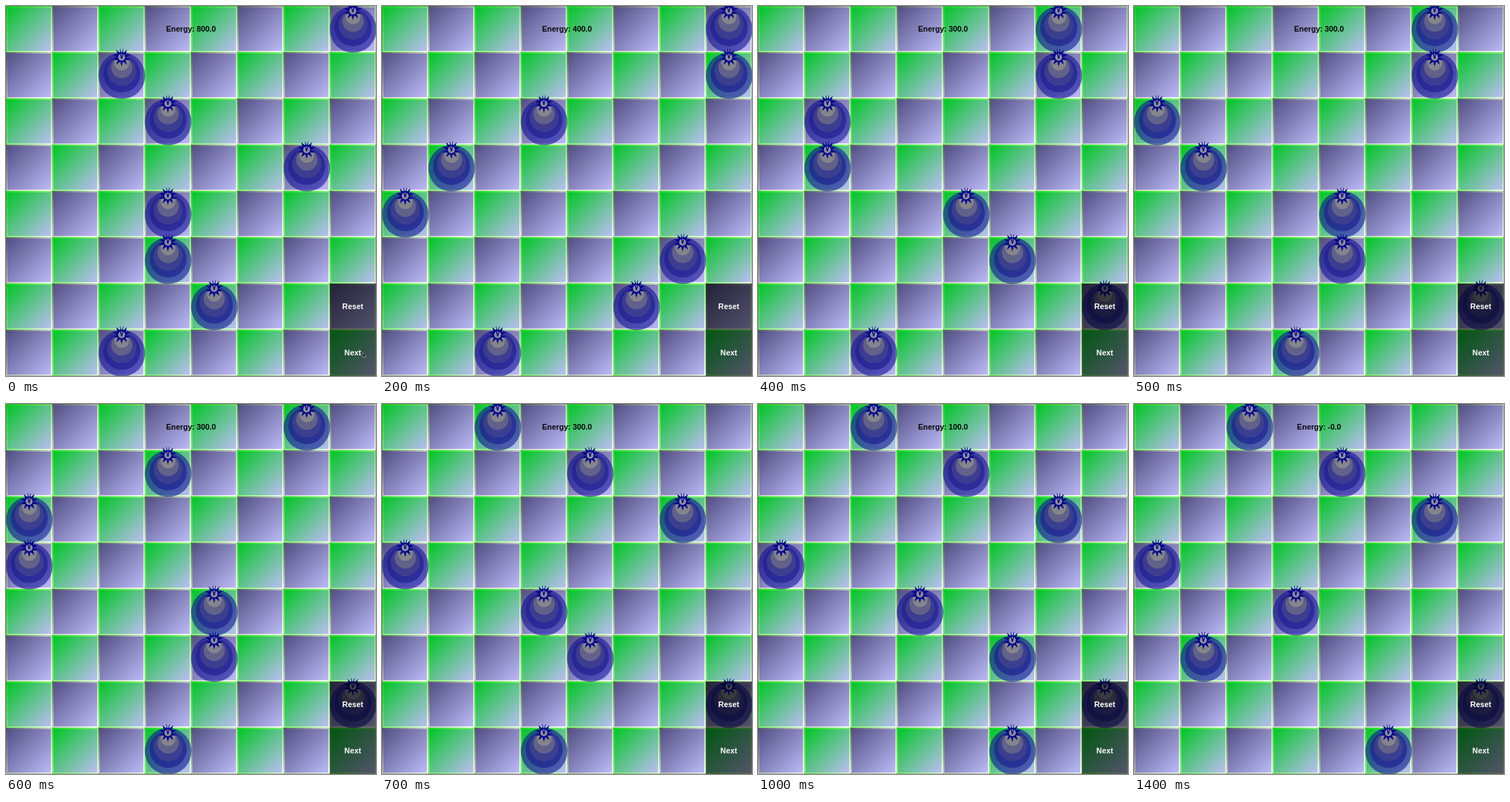
Write an HTML page that moves like this. It is 520 px wide and 520 px high and loops after 1600 ms.

```html
<!DOCTYPE html>
<html lang="en">
<head>
<meta charset="utf-8">
<title>Eight queens</title>
<style>
  html, body { margin: 0; width: 100%; height: 100%; overflow: hidden; background: #222; }
  svg { display: block; width: 520px; height: 520px; }
  text { font: bold 10.8px "Liberation Sans", Arial, sans-serif; text-anchor: middle; }
</style>
</head>
<body>
<svg id="stage" viewBox="0 0 520 520">
  <defs>
    <linearGradient id="green" x2="1" y2="1">
      <stop offset="0" stop-color="#00c624"/>
      <stop offset="1" stop-color="#bebef6"/>
    </linearGradient>
    <linearGradient id="violet" x2="1" y2="1">
      <stop offset="0" stop-color="#504e82"/>
      <stop offset="1" stop-color="#bebcf8"/>
    </linearGradient>
    <linearGradient id="greenEdge" x2="1" y2="1">
      <stop offset="0" stop-color="#14e01c"/>
      <stop offset=".5" stop-color="#7cf46c"/>
      <stop offset="1" stop-color="#e4ffe0"/>
    </linearGradient>
    <linearGradient id="violetEdge" x2="1" y2="1">
      <stop offset="0" stop-color="#5c5c70"/>
      <stop offset=".5" stop-color="#c4ccc4"/>
      <stop offset="1" stop-color="#f6fff2"/>
    </linearGradient>
    <g id="queen">
      <g id="body"></g>
      <path id="star" fill="#00008f"/>
      <circle cx="32.5" cy="7" r="5" fill="#8c8c98"/>
      <path d="M30.5 1L32.5 9L34.5 1" fill="none" stroke="#00008f" stroke-width="1.2"/>
    </g>
  </defs>
  <g id="board"></g>
  <g id="queens"></g>
  <g id="buttons"></g>
  <rect x=".5" y=".5" width="519" height="519" rx="4" fill="none" stroke="#222" stroke-opacity=".3"/>
  <text id="energy" x="260" y="36" fill="#080808"></text>
  <path id="cursor" d="M501.5 487v7l1.6-1.4 1 2.4 1.3-.6-1-2.3h2z" fill="#111" stroke="#b8c4bc" stroke-width=".6"/>
</svg>
<script>
const N = 8, CELL = 65, LOOP = 1600;

// start time, column of the queen in each row
const steps = [
  [0, "72363342"],
  [100, "72360642"],
  [200, "77310652"],
  [300, "76314552"],
  [400, "66114572"],
  [500, "66014473"],
  [600, "63004473"],
  [700, "24603473"],
  [800, "24603477"],
  [900, "24603475"],
  [1000, "24603575"],
  [1400, "24603175"]
];

const $ = id => document.getElementById(id);

function add(parent, tag, attrs) {
  const el = document.createElementNS("http://www.w3.org/2000/svg", tag);
  for (const key in attrs) el.setAttribute(key, attrs[key]);
  return parent.appendChild(el);
}

for (let i = 0; i < N * N; i++) {
  const row = Math.floor(i / N), col = i % N;
  const name = (row + col) % 2 ? "violet" : "green";
  add($("board"), "rect", {
    x: col * CELL + 1, y: row * CELL + 1, width: CELL - 2, height: CELL - 2,
    fill: `url(#${name})`, stroke: `url(#${name}Edge)`, "stroke-width": 2
  });
}

// nested discs: radius, centre height, colour
[
  [32.8, 33, "rgba(12,12,148,.56)"],
  [26, 30.5, "rgba(30,30,145,.66)"],
  [20.5, 26.5, "rgba(68,68,142,.72)"],
  [15, 21.5, "rgba(108,108,136,.78)"],
  [10.5, 15, "rgba(140,140,140,.85)"]
].forEach(([r, cy, fill]) => add($("body"), "circle", { cx: 32.8, cy, r, fill }));

// ten spikes, the top one split in two
const polar = (deg, r) => {
  const a = deg * Math.PI / 180;
  return `${(32.5 + r * Math.sin(a)).toFixed(2)} ${(7 - r * Math.cos(a)).toFixed(2)}`;
};
const points = [polar(0, 6), polar(11, 13)];
for (let deg = 36; deg < 360; deg += 36) points.push(polar(deg - 18, 6.3), polar(deg, 13));
points.push(polar(-18, 6.3), polar(-11, 13));
$("star").setAttribute("d", `M${points.join("L")}Z`);

["Reset", "Next"].forEach((label, i) => {
  const y = (6 + i) * CELL;
  add($("buttons"), "rect", { x: 455, y, width: CELL, height: CELL, fill: "#000", "fill-opacity": .56 });
  add($("buttons"), "text", { x: 487.3, y: y + 36, fill: "#fff" }).textContent = label;
});

const queens = Array.from({ length: N }, () => add($("queens"), "use", { href: "#queen" }));

// 100 for every pair sharing a column or diagonal
function energy(cols) {
  let sum = 0;
  for (let a = 0; a < N; a++)
    for (let b = a + 1; b < N; b++) {
      const d = Math.abs(cols[a] - cols[b]);
      if (d === 0 || d === b - a) sum += 100;
    }
  return (sum ? "" : "-") + sum.toFixed(1);
}

let shown = -1;
function draw(now) {
  const t = now % LOOP;
  let k = steps.length - 1;
  while (steps[k][0] > t) k--;
  if (k === shown) return;
  shown = k;
  const cols = [...steps[k][1]].map(Number);
  queens.forEach((q, row) => q.setAttribute("transform", `translate(${cols[row] * CELL} ${row * CELL})`));
  $("energy").textContent = "Energy: " + energy(cols);
  $("cursor").style.display = k === 0 ? "" : "none";
}

const start = performance.now();
function tick() {
  draw(performance.now() - start);
  requestAnimationFrame(tick);
}
tick();
</script>
</body>
</html>
```
